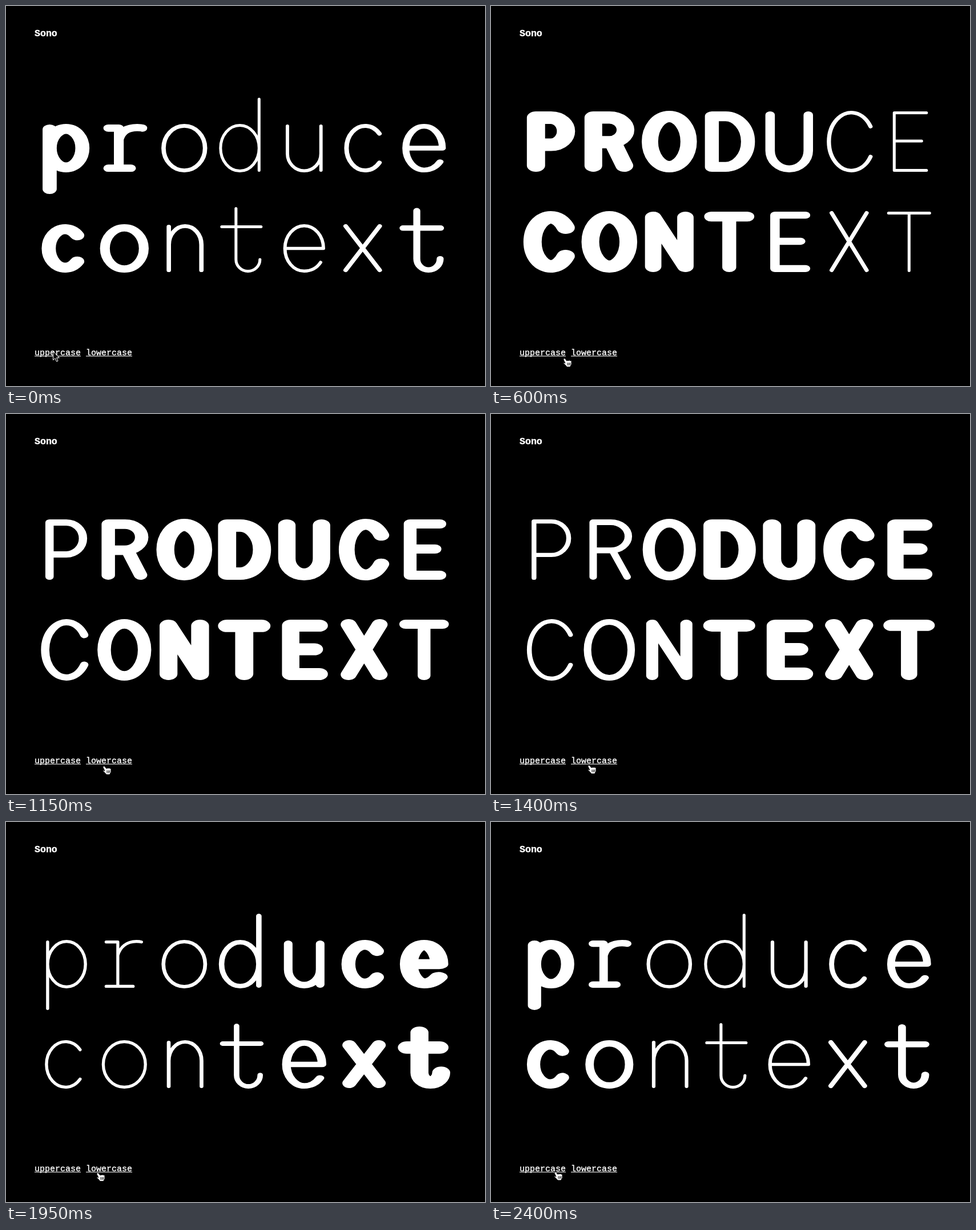
An HTML page with a canvas that plays this animation: 839 px wide and 667 px high, repeating every 2450 ms.

```html
<!DOCTYPE html>
<html lang="en">
<head>
<meta charset="utf-8">
<title>Sono</title>
<style>
  html, body { margin: 0; width: 839px; height: 667px; overflow: hidden; background: #000; }
  canvas { display: block; }
</style>
</head>
<body>
<canvas id="stage" width="839" height="667"></canvas>
<script>
const ctx = document.getElementById('stage').getContext('2d');
const LOOP = 2450, HALF = LOOP / 2, STEP = 50;
const UPPER_AT = 150, LOWER_AT = 1550;

// CSS "ease": cubic-bezier(.25, .1, .25, 1)
function ease(x) {
  const bez = (s, p, q) => 3 * s * (1 - s) ** 2 * p + 3 * s * s * (1 - s) * q + s ** 3;
  let lo = 0, hi = 1;
  for (let i = 0; i < 22; i++) {
    const mid = (lo + hi) / 2;
    if (bez(mid, .25, .25) < x) lo = mid; else hi = mid;
  }
  return bez(lo, .1, 1);
}

// Boldness 0..1 of a column: back and forth, each column a little later
function boldness(t, col) {
  const u = ((t - 1915 - col * LOOP / 12 + 2 * LOOP) % LOOP) / HALF;
  return u < 1 ? ease(u) : 1 - ease(u - 1);
}

const oval = (x1, x2, y, ry) => {
  const rx = (x2 - x1) / 2;
  return `M${x1} ${y}a${rx} ${ry} 0 1 1 ${2 * rx} 0a${rx} ${ry} 0 1 1 ${-2 * rx} 0Z`;
};
const openArc = (left, cx, cy, ry, angle) => {
  const rx = cx - left, x = cx + rx * Math.cos(angle), dy = ry * Math.sin(angle);
  return `M${x} ${cy - dy}A${rx} ${ry} 0 1 0 ${x} ${cy + dy}`;
};
const bowl = (x, right, top, bottom, round) => {
  const rx = (right - x) * round, m = right - rx;
  return `M${x} ${top}H${m}A${rx} ${(bottom - top) / 2} 0 0 1 ${m} ${bottom}H${x}`;
};
const cross = (c, x, top, v) => `M${c - x} ${top + v}L${c + x} ${-v}M${c + x} ${top + v}L${c - x} ${-v}`;

// Skeletons around the column centre and the baseline.
// b: boldness, a and v: half the pen's width and height
const glyphs = {
  P(b, a, v) {
    const x = -30 - 9.5 * b + a;
    return `M${x} ${-v}V${v - 106}` + bowl(x, 37 + 8 * b - a, v - 106, 4 * b - 40.5 - v, .5);
  },
  R(b, a, v) {
    const x = -31 - 13 * b + a, right = 38 + 6 * b - a, y = 8 * b - 49 - v;
    return `M${x} ${-v}V${v - 106}` + bowl(x, right, v - 106, y, .5) +
      `M${5 + b} ${y}L${right - 2} ${-v}`;
  },
  O: (b, a, v) => oval(a - 43 - 6 * b, 43 + 6 * b - a, -53, 54 - v),
  D: (b, a, v) => bowl(a - 34 - 12 * b, 40 + 7 * b - a, v - 106, -v, .62) + 'Z',
  U(b, a, v) {
    const x = 38.5 + 7.5 * b - a;
    return `M${-x} ${v - 106}V-37A${x} ${38 - v} 0 0 0 ${x} -37V${v - 106}`;
  },
  C: (b, a, v) => openArc(a - 38.5 - 7 * b, 4 - 1.5 * b, -53, 54 - v, .54 + .08 * b),
  E(b, a, v) {
    const x = a - 28.5 - 11 * b, right = 33 + 9 * b - a;
    return `M${right} ${v - 106}H${x}V${-v}H${right}M${x} -54H${right - 8.5}`;
  },
  N(b, a, v) {
    const x = 36 + 7.5 * b - a;
    return `M${-x} ${-v}V${v - 106}L${x} ${-v}V${v - 106}`;
  },
  T(b, a, v) {
    const x = 38.5 + 7.5 * b - a;
    return `M${-x} ${v - 106}H${x}M0 ${v - 106}V${-v}`;
  },
  X: (b, a, v) => cross(0, 33.5 + 9 * b - a, -107, v),

  p(b, a, v) {
    const x = a - 32 - 8.5 * b;
    return `M${x} ${v - 83}V${39 - v}` + oval(x, 39.5 + 6 * b - a, -41.5, 42.5 - v);
  },
  r(b, a, v) {
    const left = a - 34.5 - 5 * b, top = v - 83, right = 32.5 + 17 * b - a, x = 4 * b - 11.5;
    return `M${left} ${top}H${x}V${-v}M${left} ${-v}H${18 + 5 * b - a}` +
      `M${x} -57C${x + 4} -71 ${x + 15} ${top - 1} ${right - 9} ${top - 1}Q${right - 3} ${top - 1} ${right} ${top}`;
  },
  o: (b, a, v) => oval(a - 39.5 - 7 * b, 39.5 + 7 * b - a, -41.5, 42.5 - v),
  d(b, a, v) {
    const x = 28.5 + 11 * b - a;
    return `M${x} ${v - 130}V${-v}` + oval(a - 44 - 3 * b, x, -41.5, 42.5 - v);
  },
  u(b, a, v) {
    const x = 32 + 9.5 * b - a;
    return `M${-x} ${v - 83}V-32A${x} ${33 - v} 0 0 0 ${x} -32M${x} ${v - 83}V${-v}`;
  },
  c: (b, a, v) => openArc(a - 34 - 8 * b, 2 - b, -41.5, 42.5 - v, .7 + .06 * b),
  e(b, a, v) {
    const x = 36.5 + 6 * b - a, ry = 42.5 - v, y = -41.5;
    return `M${-x} ${y}H${x}A${x} ${ry} 0 0 0 ${-x} ${y}A${x} ${ry} 0 0 0 0 ${1 - v}` +
      `Q${x * .55} ${1 - v} ${x * .85 + 3 * b} ${-17 - 2 * b}`;
  },
  n(b, a, v) {
    const x = a - 30 - 10 * b, right = 33 + 8 * b - a;
    return `M${x} ${-v}V${v - 83}M${x} -48A${(right - x) / 2} ${36 - v} 0 0 1 ${right} -48V${-v}`;
  },
  t(b, a, v) {
    const x = 6.5 * b - 14.5, hook = 30 + 16 * b - a, y = -22 - 5 * b;
    return `M${a - 42 - 4 * b} ${v - 82}H${32 + 11 * b - a}M${x} ${6 * b - 114 + v}V${y}` +
      `A${(hook - x) / 2} ${1 - v - y} 0 0 0 ${hook} ${y}`;
  },
  x: (b, a, v) => cross(4 * b - 3, 33 + 7 * b - a, -84, v)
};

// Strokes a skeleton with an elliptical pen; the crowded "e" gets a flatter one
function drawLetter(ch, x, y, b) {
  const a = (5 + 27 * b) / 2;
  const v = (5 + (ch === 'e' ? 12.5 : 17) * b) / 2;
  const path = new Path2D();
  path.addPath(new Path2D(glyphs[ch](b, a, v)), new DOMMatrix([v / a, 0, 0, 1, 0, 0]));
  ctx.setTransform(a / v, 0, 0, 1, x, y);
  ctx.lineWidth = 2 * v;
  ctx.stroke(path);
  ctx.resetTransform();
}

function label(text, x, y, font, underline) {
  ctx.font = font + ' "Liberation Mono", monospace';
  ctx.lineWidth = .4;
  ctx.fillText(text, x, y);
  ctx.strokeText(text, x, y);
  if (underline) ctx.fillRect(x, 614, 81, 1);
}

const arrow = new Path2D('M.5 .5V15.5L4 12.3L6.5 18L9 17L6.6 11.5H11Z');
const hand = new Path2D('M2 .5Q.3 1 1 3L4 9Q2 7.4 .8 8.3Q.3 9.5 3 11L7 15.5H12.5L15 11V5.5' +
  'Q14.5 4 13 4.8Q11.5 3 10 4.5Q8.5 3.4 7 5L4 1.2Q3 0 2 .5Z');
const fingers = new Path2D('M8 8.5v4M10.4 8.5v4M12.6 8.5v3.5');
// time, x, y
const route = [[0, 82, 606], [50, 83, 609], [150, 85, 613], [350, 85, 613], [600, 126, 618],
  [850, 164, 618], [1050, 169, 618], [1400, 169, 616], [1850, 169, 615],
  [2150, 136, 615.5], [2300, 118, 613.5], [2400, 110, 613.5], [LOOP, 82, 606]];

function drawCursor(t) {
  const i = route.findIndex(p => p[0] > t);
  const [t0, x0, y0] = route[i - 1], [t1, x1, y1] = route[i], u = (t - t0) / (t1 - t0);
  ctx.save();
  ctx.translate(x0 + (x1 - x0) * u, y0 + (y1 - y0) * u);
  ctx.lineWidth = 1;
  if (t < 50) {
    ctx.fillStyle = '#000';
    ctx.fill(arrow);
    ctx.stroke(arrow);
  } else {
    ctx.strokeStyle = '#000';
    ctx.fill(hand);
    ctx.stroke(hand);
    ctx.stroke(fingers);
  }
  ctx.restore();
}

function draw(now) {
  const t = Math.floor(now % LOOP / STEP) * STEP;
  const upper = t >= UPPER_AT && t < LOWER_AT;
  ctx.fillStyle = '#000';
  ctx.fillRect(0, 0, 839, 667);
  ctx.fillStyle = ctx.strokeStyle = '#fff';
  ctx.lineCap = ctx.lineJoin = 'round';
  ['produce', 'context'].forEach((word, row) => {
    [...(upper ? word.toUpperCase() : word)].forEach((ch, col) =>
      drawLetter(ch, 102.3 + 105 * col, 291 + 176 * row, boldness(t, col)));
  });
  label('Sono', 50, 53, 'bold 16.6px');
  label('uppercase', 50, 613, '15px', true);
  label('lowercase', 140, 613, '15px', true);
  drawCursor(t);
}

let start;
function tick(now) {
  start ??= now;
  draw(now - start);
  requestAnimationFrame(tick);
}
draw(0);
requestAnimationFrame(tick);
</script>
</body>
</html>
```
